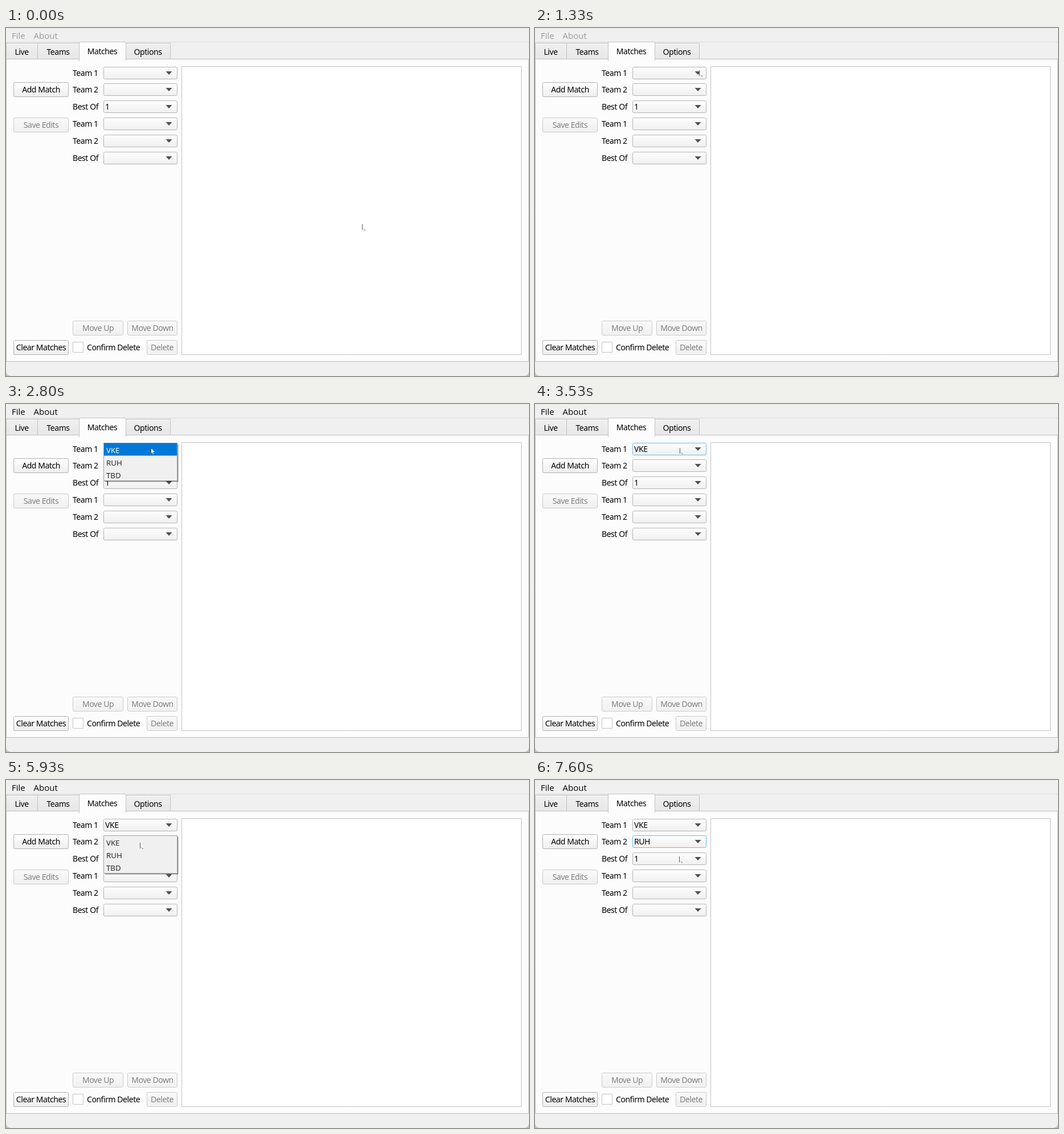
Write an HTML page with a canvas that moves like this. It is 918 px wide and 610 px high and loops after 8 s.

```html
<!DOCTYPE html>
<html lang="en">
<head>
<meta charset="utf-8">
<title>Match editor</title>
<style>
  html, body { margin: 0; width: 100%; height: 100%; overflow: hidden; background: #f0f0f0; }
  canvas { display: block; }
</style>
</head>
<body>
<canvas id="stage" width="918" height="610"></canvas>
<script>
const ctx = document.getElementById('stage').getContext('2d');
const LOOP = 8000, FPS = 15;
const UI = '14px "Noto Sans", "Open Sans", sans-serif';
const ITEM = '13.3px "Open Sans", "Noto Sans", sans-serif';
const MENU = '15px "Open Sans", "Noto Sans", sans-serif';
const TEAMS = ['VKE', 'RUH', 'TBD'];
const rowY = i => Math.round(67.6 + i * 29.8);

// Pointer moves: first tick, number of ticks, end point
const START = [625, 344];
const MOVES = [
  [6, 13, 292, 78], [19, 2, 288, 74], [38, 5, 254, 77],
  [61, 4, 236, 108], [89, 5, 230, 131], [111, 4, 253, 134]
];

function pointer(tick) {
  let [x, y] = START;
  for (const [first, count, toX, toY] of MOVES) {
    const p = Math.min(1, Math.max(0, (tick - first + 1) / count));
    const e = p * p * (3 - 2 * p);
    x += (toX - x) * e;
    y += (toY - y) * e;
  }
  return [Math.round(x), Math.round(y)];
}

function rect(x, y, w, h, fill) {
  ctx.fillStyle = fill;
  ctx.fillRect(x, y, w, h);
}

function box(x, y, w, h, fill, stroke, r = 0) {
  ctx.beginPath();
  ctx.roundRect(x + 0.5, y + 0.5, w - 1, h - 1, r);
  ctx.fillStyle = fill;
  ctx.fill();
  ctx.strokeStyle = stroke;
  ctx.stroke();
}

function text(str, x, y, color = '#000', font = UI, align = 'left') {
  ctx.font = font;
  ctx.letterSpacing = font === UI ? '-0.45px' : '0px';
  ctx.textAlign = align;
  ctx.fillStyle = color;
  ctx.fillText(str, x, y);
}

function shade(y, h, top, bottom) {
  const g = ctx.createLinearGradient(0, y, 0, y + h);
  g.addColorStop(0, top);
  g.addColorStop(1, bottom);
  return g;
}

function button(label, x, y, w, enabled) {
  const fill = enabled ? shade(y, 26, '#fefefe', '#eeeeee') : shade(y, 26, '#f9f9f9', '#f0f0f0');
  box(x, y, w, 26, fill, enabled ? '#b2b2b2' : '#cbcbcb', 2);
  text(label, x + w / 2, y + 18, enabled ? '#000' : '#808080', UI, 'center');
}

function tab(label, x, w, active) {
  const y = active ? 24 : 26;
  box(x, y, w + 1, active ? 34 : 29, active ? '#fcfcfc' : shade(y, 29, '#f0f0f0', '#e7e7e7'), '#c2c2c2');
  if (active) rect(x + 1, 54, w - 1, 5, '#fcfcfc');
  text(label, x + w / 2, active ? 46 : 47, '#000', UI, 'center');
}

function combo(i, label, value, focused) {
  const y = rowY(i);
  text(label, 117, y + 16);
  box(171, y, 130, 22, shade(y, 22, '#fefefe', '#efefef'), focused ? '#6dbbea' : '#b4b4b4', 2);
  text(value, 174, y + 16);
  ctx.beginPath();
  ctx.moveTo(280.5, y + 8);
  ctx.lineTo(291.5, y + 8);
  ctx.lineTo(286, y + 14);
  ctx.fillStyle = '#505050';
  ctx.fill();
}

function popup(i, active) {
  const y = rowY(i);
  rect(174, y + 3, 129, 66, 'rgba(0,0,0,.16)');
  rect(173, y + 2, 129, 66, 'rgba(0,0,0,.35)');
  box(171, y, 130, 67, '#f0f0f0', '#a0a0a0');
  TEAMS.forEach((team, n) => {
    const top = y + n * 22;
    if (n === active) rect(172, top + 0.5, 128, 22, '#0078d7');
    text(team, 176, top + 17.5, n === active ? '#fff' : '#1a1a1a', ITEM);
  });
}

function arrow(x, y) {
  ctx.beginPath();
  [[0, 0], [0, 10], [2.3, 8], [4, 11.5], [5.5, 10.8], [4, 7.3], [7, 7]]
    .forEach(([dx, dy]) => ctx.lineTo(x + dx, y + dy));
  ctx.closePath();
  ctx.fillStyle = '#fff';
  ctx.fill();
  rect(x, y, 1, 10, '#505050');
  rect(x + 3, y + 8, 1, 2, '#8a8a8a');
  rect(x + 4, y + 10, 2, 1, '#777');
}

function draw(tick) {
  const focused = tick >= 27;
  const open = tick >= 27 && tick < 53 ? 0 : tick >= 75 && tick < 106 ? 1 : -1;
  const [x, y] = pointer(tick);

  rect(0, 0, 918, 610, '#c6c6c6');
  ctx.beginPath();
  ctx.roundRect(0, 0, 918, 610, [0, 0, 9, 9]);
  ctx.fillStyle = '#f0f0f0';
  ctx.fill();

  const menuColor = focused ? '#000' : '#9a9a9a';
  text('File', 10, 18.5, menuColor, MENU);
  text('About', 48.5, 18.5, menuColor, MENU);
  rect(0, 24, 918, 1, '#dedede');

  box(0, 54, 918, 531, '#fcfcfc', '#bebebe');
  tab('Live', 0, 55, false);
  tab('Teams', 55, 73, false);
  tab('Options', 210, 78, false);
  tab('Matches', 128, 82, true);
  box(308, 67, 597, 506, '#fff', '#c2c2c2');

  button('Add Match', 13, 95, 97, true);
  button('Save Edits', 13, 157, 97, false);
  button('Move Up', 117, 513, 89, false);
  button('Move Down', 213, 513, 88, false);
  button('Clear Matches', 13, 547, 97, true);
  button('Delete', 247, 547, 54, false);
  box(117, 550, 19, 19, '#fff', '#c4c4c4');
  text('Confirm Delete', 142, 565);

  const values = [tick >= 53 ? TEAMS[0] : '', tick >= 106 ? TEAMS[1] : '', '1', '', '', ''];
  const focusRow = tick >= 106 ? 1 : tick >= 53 && tick < 75 ? 0 : -1;
  values.forEach((value, i) =>
    combo(i, ['Team 1', 'Team 2', 'Best Of'][i % 3], value, i === focusRow));

  if (open >= 0) {
    const hover = tick >= (open ? 90 : 39);
    popup(open, hover ? Math.floor((y - rowY(open)) / 22) : -1);
  }
  arrow(x, y);
}

function play(now) {
  // small offset keeps rounded millisecond times on the right tick
  draw(Math.floor((now % LOOP + 4) * FPS / 1000));
  requestAnimationFrame(play);
}
requestAnimationFrame(play);
</script>
</body>
</html>
```
